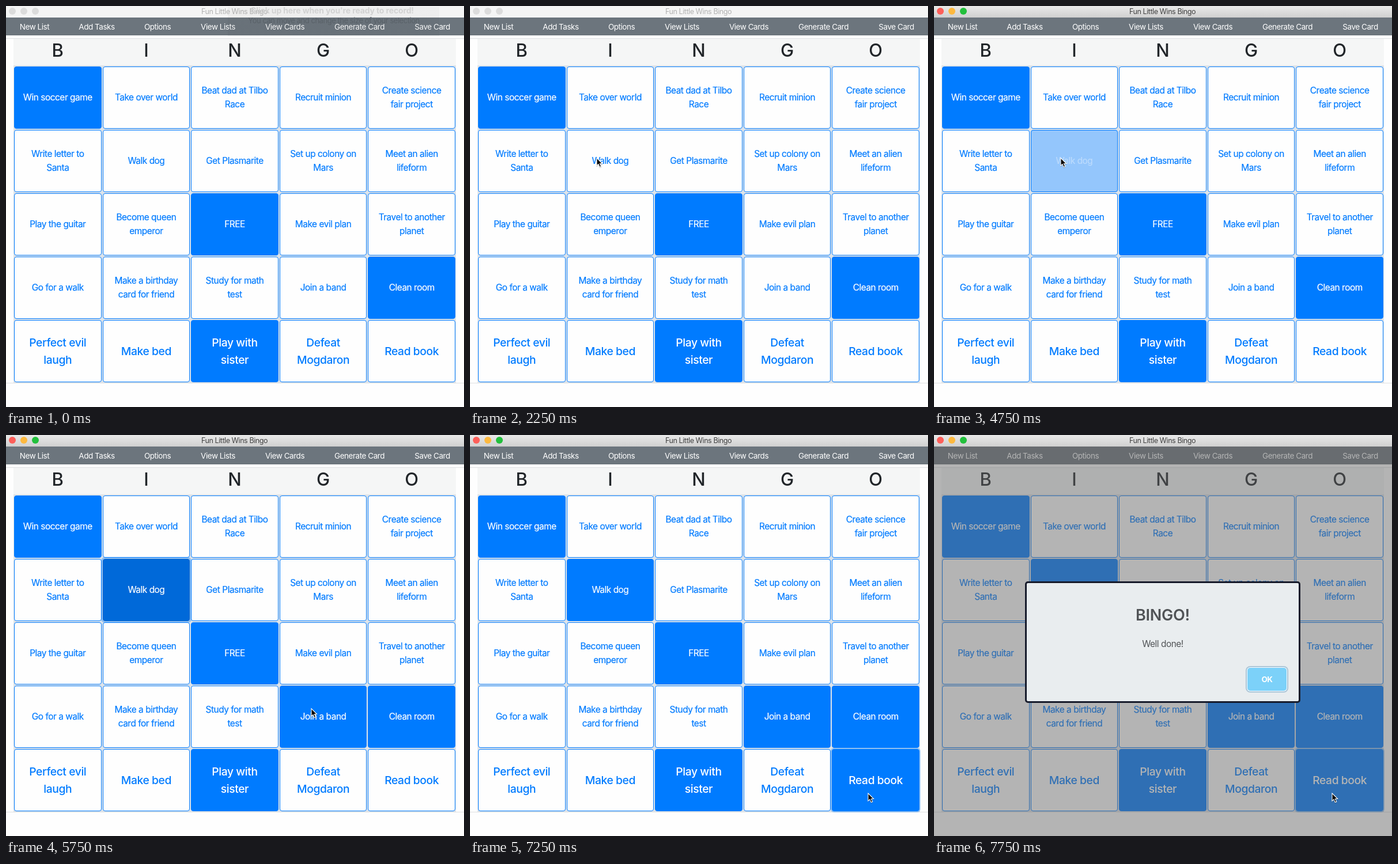
An HTML page for the animation above (8000 ms loop, 795x696 px).

```html
<!DOCTYPE html>
<html lang="en">
<head>
<meta charset="utf-8">
<title>Bingo card</title>
<style>
  html, body { margin: 0; width: 100%; height: 100%; overflow: hidden; background: #fefefe; }
  body { font: 400 15.4px/24px Inter, Roboto, sans-serif; letter-spacing: -.03em; }
  #stage { position: relative; width: 795px; height: 696px; overflow: hidden; background: #fefefe; }
  #stage > *, .mid, .box { position: absolute; box-sizing: border-box; }
  .mid { transform: translate(-50%, -50%); white-space: nowrap; text-align: center; }

  #bar { left: 0; top: 0; width: 795px; height: 20px; background: #f5f5f5; color: #b2b2b2; font-size: 12.6px; }
  #bar.live { background: linear-gradient(#e9e9e9, #d0d0d0); color: #404040; }
  #bar i { position: absolute; top: 3px; width: 12px; height: 12px; border-radius: 50%; background: #dcdcdc; }
  #bar.live i { background: var(--c); }
  #nav { left: 0; top: 20px; width: 795px; height: 31px; background: #6c757d; color: #fff; font-size: 13.5px; }
  .rule { left: 0; width: 795px; height: 1px; background: #dee0e2; }
  #head { left: 13px; top: 57px; width: 768px; height: 46px; background: #f5f6f6; color: #212529;
    font-size: 31px; font-weight: 500; letter-spacing: 0; }
  #grid { left: 13px; top: 103px; width: 768px; height: 551px; background: #dfe4e9; }

  .cell { display: flex; align-items: center; justify-content: center; text-align: center;
    width: 151.6px; height: 108px; border: 1px solid #007bff; border-radius: 4px;
    background: #fefefe; color: #007bff; white-space: pre; -webkit-text-stroke: .2px; }
  .cell.big { font-size: 19.3px; line-height: 30px; letter-spacing: -.022em; font-weight: 500; -webkit-text-stroke: 0; }
  .cell.on { background: #007bff; color: #fff; }
  .cell.fade { background: #94c6fc; color: #bcdbfd; }
  .cell.soft { box-shadow: 0 0 0 2px rgba(0, 123, 255, .35); z-index: 1; }
  .cell.focus { background: #0069d9; border-color: #0062cc; color: #fff;
    box-shadow: 0 0 0 3.2px rgba(0, 123, 255, .35); z-index: 1; }

  #tip { left: 385px; top: 2px; width: 367px; height: 50px; font-size: 13px;
    background: linear-gradient(rgba(120, 120, 120, .06) 18px, rgba(50, 55, 60, .06) 18px); }
  #shade { left: 0; top: 20px; width: 795px; height: 676px; background: rgba(98, 98, 98, .48); z-index: 2; }
  #modal { left: 158px; top: 254px; width: 478px; height: 211px; border: 3px solid #171b2b;
    border-radius: 5px; background: #e9edef; color: #505356; z-index: 3; }
  #modal h1 { margin: 0; left: 236px; top: 56px; font-size: 27px; line-height: 32px; font-weight: 600; letter-spacing: -.01em; }
  #ok { left: 383px; top: 147px; width: 68px; height: 40px; border-radius: 5px; background: #7cd1f9;
    color: #fff; font-size: 13.5px; font-weight: 700; line-height: 40px; text-align: center;
    box-shadow: 0 0 0 1px #fff, 0 0 0 3px rgba(43, 114, 165, .32); }
  #arrow { left: 0; top: 0; z-index: 4; filter: drop-shadow(0 1px .6px rgba(0, 0, 0, .25)); }
</style>
</head>
<body>
<div id="stage">
  <div id="bar">
    <i style="left:5px;--c:#fc5f5a"></i><i style="left:25px;--c:#fdb93f"></i><i style="left:45px;--c:#22c03c"></i>
  </div>
  <div id="nav"></div>
  <div id="tip"></div>
  <div class="rule" style="top:56px"></div>
  <div class="rule" style="top:654px"></div>
  <div id="head"></div>
  <div id="grid"></div>
  <div id="shade"></div>
  <div id="modal">
    <h1 class="mid">BINGO!</h1>
    <div class="mid" style="left:236px;top:106px">Well done!</div>
    <div id="ok" class="box">OK</div>
  </div>
  <svg id="arrow" width="16" height="22">
    <path d="M1 .8V14.2L4 11.4 6.2 16.6 8.7 15.6 6.5 10.5H10.6Z" stroke="#fff" stroke-width="1.1"/>
  </svg>
</div>
<script>
  const $ = id => document.getElementById(id);
  const LOOP = 8000, PITCH = 153.6;

  function label(parent, text, x, y, style = '') {
    const el = document.createElement('div');
    el.className = 'mid';
    el.textContent = text;
    el.style.cssText = `left:${x}px;top:${y}px;${style}`;
    parent.append(el);
  }

  label($('bar'), 'Fun Little Wins Bingo', 396.5, 9.5);
  [['New List', 49.5], ['Add Tasks', 157.5], ['Options', 263], ['View Lists', 368],
   ['View Cards', 484], ['Generate Card', 613.5], ['Save Card', 740]]
    .forEach(([text, x]) => label($('nav'), text, x, 16));
  [...'BINGO'].forEach((c, i) => label($('head'), c, PITCH * (i + .5), 20));
  label($('tip'), "Click up here when you're ready to record!", 181, 6,
    'color:#d2d2d2;font-size:14px;font-weight:700;letter-spacing:-.01em');
  label($('tip'), 'You can move and change the size of your selection', 184, 23, 'color:#596168');

  const tasks = [
    'Win soccer game', 'Take over world', 'Beat dad at Tilbo\nRace', 'Recruit minion', 'Create science\nfair project',
    'Write letter to\nSanta', 'Walk dog', 'Get Plasmarite', 'Set up colony on\nMars', 'Meet an alien\nlifeform',
    'Play the guitar', 'Become queen\nemperor', 'FREE', 'Make evil plan', 'Travel to another\nplanet',
    'Go for a walk', 'Make a birthday\ncard for friend', 'Study for math\ntest', 'Join a band', 'Clean room',
    'Perfect evil\nlaugh', 'Make bed', 'Play with\nsister', 'Defeat\nMogdaron', 'Read book'
  ];
  const marked = [0, 12, 19, 22];
  const cells = tasks.map((text, i) => {
    const el = document.createElement('div'), row = Math.floor(i / 5);
    el.textContent = text;
    el.style.left = 1 + PITCH * (i % 5) + 'px';
    el.style.top = 2 + 110 * row + 'px';
    el.base = 'box cell' + (row === 4 ? ' big' : '') + (marked.includes(i) ? ' on' : '');
    el.className = el.base;
    $('grid').append(el);
    return el;
  });

  // Each step: start time, then the values held until the next step.
  const cellSteps = {
    6: [[0, ''], [4750, 'fade'], [5000, 'focus'], [6250, 'on']],
    18: [[0, ''], [5500, 'on'], [6250, 'on soft'], [6500, 'focus'], [7250, 'on']],
    24: [[0, ''], [6750, 'on'], [7250, 'on soft']]
  };
  const arrowSteps = [
    [0, -40, -40], [500, 323, 165], [750, 249, 137], [1000, 208, 122], [1250, 153, 150],
    [1750, 160, 179], [2000, 205, 241], [2250, 219, 263], [5250, 376, 349], [5500, 499, 451],
    [5750, 529, 474], [6500, 601, 530], [6750, 689, 621], [7000, 690, 621]
  ];
  const modalSteps = [[0, 1, 0], [7500, .95, .94], [7750, 1, 1]];
  const at = (steps, t) => steps.filter(s => s[0] <= t).pop().slice(1);

  function draw(t) {
    $('tip').style.opacity = t < 250 ? 1 : 0;
    $('bar').className = t >= 2750 ? 'live' : '';
    for (const i in cellSteps) cells[i].className = cells[i].base + ' ' + at(cellSteps[i], t)[0];
    const [x, y] = at(arrowSteps, t);
    $('arrow').style.transform = `translate(${x}px, ${y}px)`;
    const [scale, alpha] = at(modalSteps, t);
    $('modal').style.transform = `scale(${scale})`;
    $('modal').style.opacity = alpha;
    $('shade').style.opacity = alpha ? 1 : 0;
  }

  const start = performance.now();
  function tick() {
    draw((performance.now() - start) % LOOP);
    requestAnimationFrame(tick);
  }
  tick();
</script>
</body>
</html>
```
